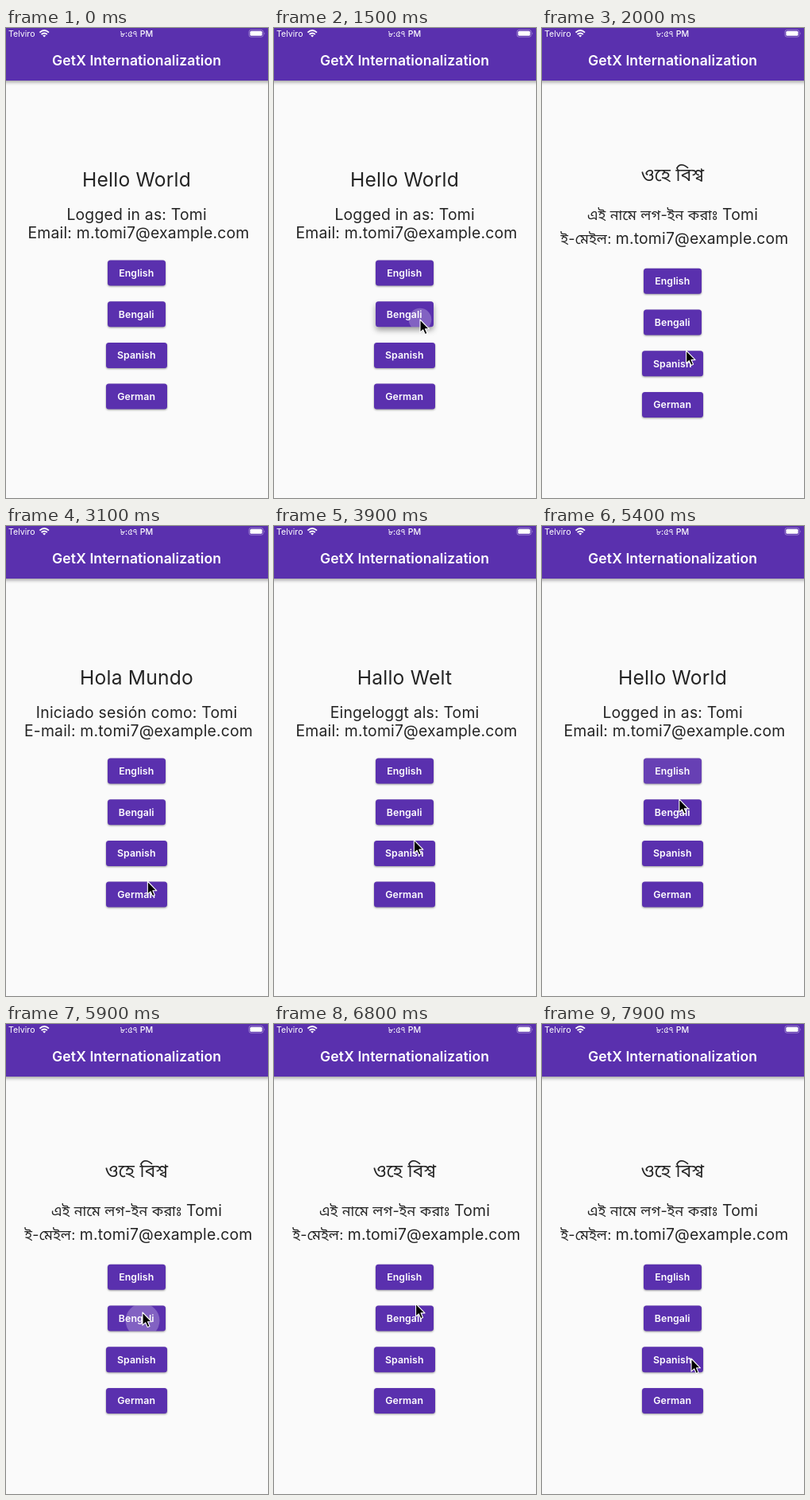
An HTML page that plays this animation: 330 px wide and 590 px high, repeating every 8000 ms.

```html
<!DOCTYPE html>
<html lang="en">
<head>
<meta charset="utf-8">
<style>
  html, body { margin: 0; width: 100%; height: 100%; overflow: hidden; background: #fafafa; }
  svg { display: block; width: 330px; height: 590px; }
  text { font-family: Inter, "Noto Sans Bengali", "Noto Sans", sans-serif; text-anchor: middle; fill: #242424; letter-spacing: .2px; }
  .bar { fill: #5a30ae; filter: drop-shadow(0 2px 2px rgba(0,0,0,.36)); }
  .status { font-size: 10.6px; fill: #fff; letter-spacing: 0; }
  .title { font-size: 17.6px; font-weight: 600; fill: #fff; letter-spacing: .08px; }
  .head { font-size: 24.64px; }
  .body { font-size: 19.36px; }
  .bengali { font-size: .925em; }
  .label { font-size: 12.32px; font-weight: 600; fill: #fff; letter-spacing: .1px; }
  .face { fill: #5a30ae; }
</style>
</head>
<body>
<svg viewBox="0 0 330 590">
  <rect width="330" height="590" fill="#fafafa"/>
  <rect class="bar" x="-6" y="-6" width="342" height="72"/>
  <text class="status" x="3" y="11" style="text-anchor:start">Telviro</text>
  <g fill="none" stroke="#fff" stroke-width="1.9">
    <path d="M42.4 5.6Q48.2 .4 54 5.6M44.6 8Q48.2 4.8 51.8 8"/>
    <path d="M48.2 11.6L46.2 9.6Q48.2 8 50.2 9.6Z" fill="#fff" stroke="none"/>
  </g>
  <text class="status" x="164.5" y="11" style="font-weight:500">৮:৫৭ PM</text>
  <rect x="306" y="2.4" width="18" height="8.8" rx="2.6" fill="none" stroke="#fff" stroke-opacity=".4" stroke-width=".9"/>
  <rect x="307.4" y="3.8" width="15.2" height="6" rx="1.5" fill="#fff"/>
  <path d="M325.4 5.4q1.3 1.4 0 2.8z" fill="#fff" opacity=".5"/>
  <text class="title" x="164.6" y="47.2">GetX Internationalization</text>
  <text class="head" id="head" x="164.5"/>
  <text class="body" id="user" x="164.6" y="241"/>
  <text class="body" id="mail" x="167"/>
  <g id="buttons"></g>
  <path id="cursor" d="M0 0V16.2L3.7 12.8L6.3 18.6L9 17.4L6.5 11.8H11.5Z" fill="#000" stroke="#fff" stroke-width="1.1" stroke-linejoin="round"/>
</svg>
<script>
const $ = id => document.getElementById(id);
const name = "Tomi", address = "m.tomi7@example.com";
const ENGLISH = 0, BENGALI = 1, SPANISH = 2, GERMAN = 3;
const labels = ["English", "Bengali", "Spanish", "German"];
const copy = [
  ["Hello World", "Logged in as: ", "Email: "],
  ["ওহে বিশ্ব", "এই নামে লগ-ইন করাঃ ", "ই-মেইল: "],
  ["Hola Mundo", "Iniciado sesión como: ", "E-mail: "],
  ["Hallo Welt", "Eingeloggt als: ", "Email: "]
];
const middle = 164.5, pitch = 51.7, hold = 150;
const firstButton = lang => lang === BENGALI ? 317.8 : 307.5;

// where the pointer stops, and the button it presses there
const stops = [
  { at: 500, x: 205, y: 455 },
  { at: 1400, x: 184, y: 366, press: BENGALI },
  { at: 2350, x: 181, y: 414, press: SPANISH },
  { at: 3400, x: 178, y: 450, press: GERMAN },
  { at: 5050, x: 174, y: 315, press: ENGLISH },
  { at: 5750, x: 172, y: 362, press: BENGALI },
  { at: 6450, x: 177, y: 350 },
  { at: 7250, x: 180, y: 352 },
  { at: 7900, x: 188, y: 420 }
];
const taps = stops.filter(s => s.press !== undefined);

const buttons = labels.map((label, i) => {
  const w = i < 2 ? 73 : 77;
  const box = `x="${-w / 2}" y="-16" width="${w}" height="32" rx="3.5"`;
  $("buttons").insertAdjacentHTML("beforeend", `<g transform="translate(${middle} ${i * pitch})">
    <clipPath id="clip${i}"><rect ${box}/></clipPath>
    <rect class="face" ${box}/>
    <g clip-path="url(#clip${i})"><circle fill="#fff"/></g>
    <text class="label" x="-.3" y="4.4">${label}</text></g>`);
  const g = $("buttons").lastElementChild;
  return { face: g.querySelector(".face"), ripple: g.querySelector("circle") };
});

const clamp = v => Math.max(0, Math.min(1, v));

function setAttributes(el, attrs) {
  for (const key in attrs) el.setAttribute(key, attrs[key]);
}

function pointer(t) {
  const i = stops.findLastIndex(s => s.at <= t);
  const a = stops[i], b = stops[i + 1] || a;
  const k = clamp((t - a.at - hold) / (b.at - a.at - hold || 1));
  const e = 1 - (1 - k) ** 2;
  return [a.x + (b.x - a.x) * e, a.y + (b.y - a.y) * e];
}

let shown = -1;
function setLanguage(lang) {
  if (lang === shown) return;
  shown = lang;
  const bengali = lang === BENGALI;
  const [head, user, mail] = copy[lang].map(s => bengali ? `<tspan class="bengali">${s}</tspan>` : s);
  $("head").innerHTML = head;
  $("user").innerHTML = user + name;
  $("mail").innerHTML = mail + address;
  $("head").setAttribute("y", bengali ? 192 : 199);
  $("mail").setAttribute("y", bengali ? 271 : 264.2);
  $("buttons").setAttribute("transform", `translate(0 ${firstButton(lang)})`);
}

function draw(t) {
  let lang = ENGLISH;
  const lift = labels.map(() => 0);
  buttons.forEach(b => b.ripple.setAttribute("opacity", 0));
  for (const { at, x, y, press } of taps) {
    const age = t - at;
    if (age < 0) break;
    if (age < 500) {
      setAttributes(buttons[press].ripple, {
        cx: x - middle,
        cy: y - firstButton(lang) - press * pitch,
        r: age * .143,
        opacity: .24 * (1 - clamp((age - hold) / 300))
      });
    }
    if (age < hold) lift[press] = clamp(age / 100);
    else lang = press;
  }
  setLanguage(lang);
  buttons.forEach((b, i) => {
    const s = lift[i];
    b.face.style.filter = `drop-shadow(0 ${1.5 + 3 * s}px ${1.3 + 2.2 * s}px rgba(0,0,0,.38))`;
  });
  const visible = t >= stops[0].at;
  $("cursor").style.display = visible ? "" : "none";
  if (visible) $("cursor").setAttribute("transform", `translate(${pointer(t)})`);
}

const start = performance.now();
function frame() {
  const t = (performance.now() - start) % 8000;
  draw(Math.floor(t / 100) * 100);
  requestAnimationFrame(frame);
}
frame();
</script>
</body>
</html>
```
